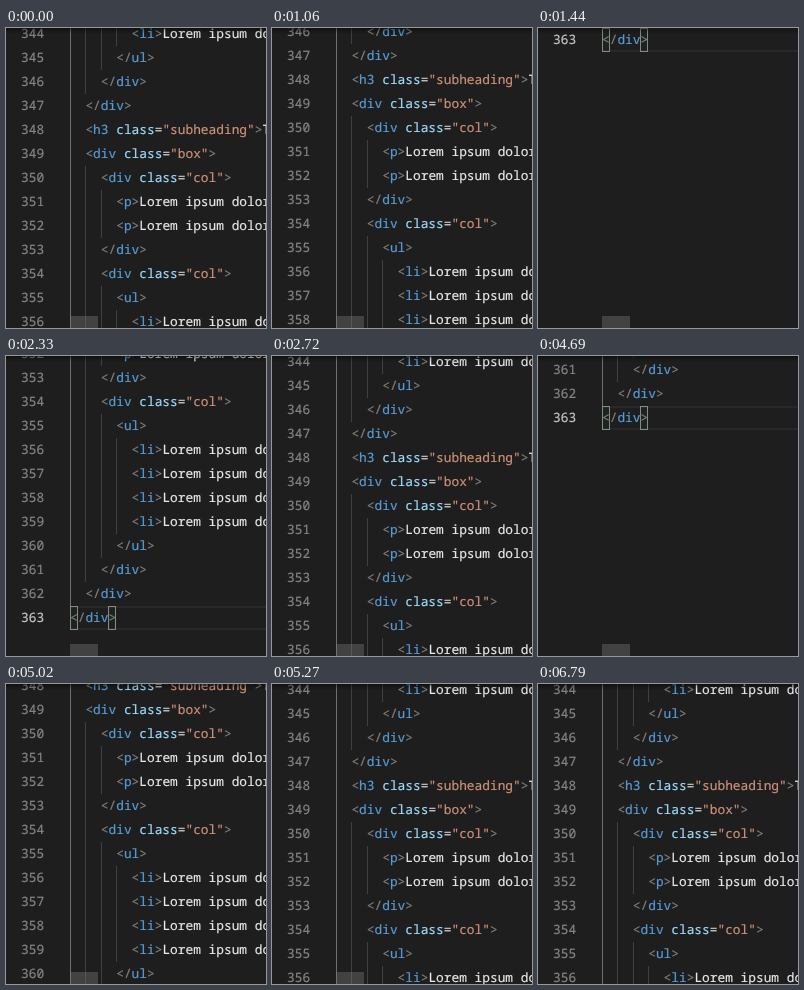
An HTML page for the animation above (6.97 s loop, 260 px wide and 300 px high).

```html
<!DOCTYPE html>
<html lang="en">
<head>
<meta charset="utf-8">
<title>Editor scrolling</title>
<style>
  html, body { margin: 0; width: 100%; height: 100%; overflow: hidden; background: #1e1e1e; }
  #stage { position: relative; width: 260px; height: 300px; overflow: hidden; background: #1e1e1e; }
  #code {
    position: absolute; top: -6px; left: 0; width: 260px;
    font: 12.83px/24px "Noto Sans Mono", "DejaVu Sans Mono", monospace;
    text-rendering: geometricPrecision; font-variant-ligatures: none;
    -webkit-text-stroke: .2px; white-space: pre; color: #e8e8e8;
  }
  .row { position: relative; height: 24px; }
  .row > * { position: absolute; top: 0; height: 24px; box-sizing: border-box; }
  .row > .num, .row > .text { top: -1px; }
  .num { left: 15px; color: #858585; }
  .guide { width: 1px; background: #404040; }
  .guide.on { background: #707070; }
  .current { left: 64px; width: 200px; border: solid #282828; border-width: 2px 0; }
  .match { width: 8px; border: 1px solid #888; background: rgba(0, 100, 0, .1); }
  .active .num { color: #c6c6c6; }
  .br { color: #808080; }
  .tag { color: #569cd6; }
  .attr { color: #9cdcfe; }
  .eq { color: #d4d4d4; }
  .str { color: #ce9178; }
  #shadow { position: absolute; top: 0; left: 0; width: 100%; height: 6px; box-shadow: #000 0 6px 6px -6px inset; }
  #slider { position: absolute; left: 64px; top: 288px; width: 28px; height: 12px; background: rgba(121, 121, 121, .4); }
</style>
</head>
<body>
<div id="stage">
  <div id="code"></div>
  <div id="shadow"></div>
  <div id="slider"></div>
</div>
<script>
const LEFT = 64, CHAR = 7.698, LOOP = 6970, FIRST_LINE = 344;
const NOTCH = 50, NOTCHES = 9, TICK = 64;
const code = document.getElementById('code');
const slider = document.getElementById('slider');

const item = '<li>Lorem ipsum dolor';
const para = '<p>Lorem ipsum dolor sit';
// Two leading spaces per indent level
const lines = `
        ${item}
      </ul>
    </div>
  </div>
  <h3 class="subheading">T
  <div class="box">
    <div class="col">
      ${para}
      ${para}
    </div>
    <div class="col">
      <ul>
        ${item}
        ${item}
        ${item}
        ${item}
      </ul>
    </div>
  </div>
</div>`.split('\n').slice(1);

function add(parent, cls, text, left) {
  const el = document.createElement('span');
  el.className = cls;
  el.textContent = text;
  if (left !== undefined) el.style.left = left + 'px';
  parent.append(el);
  return el;
}

function addLine(line, i) {
  const row = document.createElement('div');
  const last = i === lines.length - 1;
  row.className = last ? 'row active' : 'row';
  if (last) {
    add(row, 'current', '');
    add(row, 'match', '', LEFT);
    add(row, 'match', '', LEFT + 38);
  }
  const [, indent, open, tag, attr, value, rest] =
    line.match(/^( *)(<\/?)(\w+)(?: (\w+)=("\w+"))?>(.*)$/);
  add(row, 'num', FIRST_LINE + i);
  for (let col = 0; col < indent.length; col += 2) {
    add(row, col ? 'guide' : 'guide on', '', Math.round(LEFT + col * CHAR));
  }
  const text = add(row, 'text', '', LEFT + indent.length * CHAR);
  add(text, 'br', open);
  add(text, 'tag', tag);
  if (attr) {
    add(text, 'attr', ' ' + attr);
    add(text, 'eq', '=');
    add(text, 'str', value);
  }
  add(text, 'br', '>');
  text.append(rest);
  code.append(row);
}
lines.forEach(addLine);

// Wheel runs, alternately down and up
const runs = [
  { start: 1060, end: 1440, power: 1.2 },
  { start: 2140, end: 2720, power: 1.7 },
  { start: 3510, end: 3900, power: 2.2 },
  { start: 4690, end: 5270, power: 2.2 }
];

// Whole notches turned so far in a run, eased out and sampled once per tick
function turned(t, { start, end, power }) {
  if (t < start) return 0;
  const span = end - start;
  const ticks = Math.round(span / TICK);
  const tick = Math.min(ticks, Math.floor((t - start + 5) * ticks / span));
  const p = t < end ? Math.min(tick + 1, ticks) / (ticks + 1) : 1;
  return Math.floor(NOTCHES * (1 - (1 - p) ** power));
}

const begin = performance.now();
function draw(now) {
  const t = Math.max(0, now - begin) % LOOP;
  const notches = runs.reduce((sum, run, i) => sum + (i % 2 ? -1 : 1) * turned(t, run), 0);
  code.style.transform = `translateY(${-notches * NOTCH}px)`;
  slider.style.opacity = t < 6410 ? 1 : t < 6790 ? 0.5 : 0;
  requestAnimationFrame(draw);
}
draw(begin);
</script>
</body>
</html>
```
